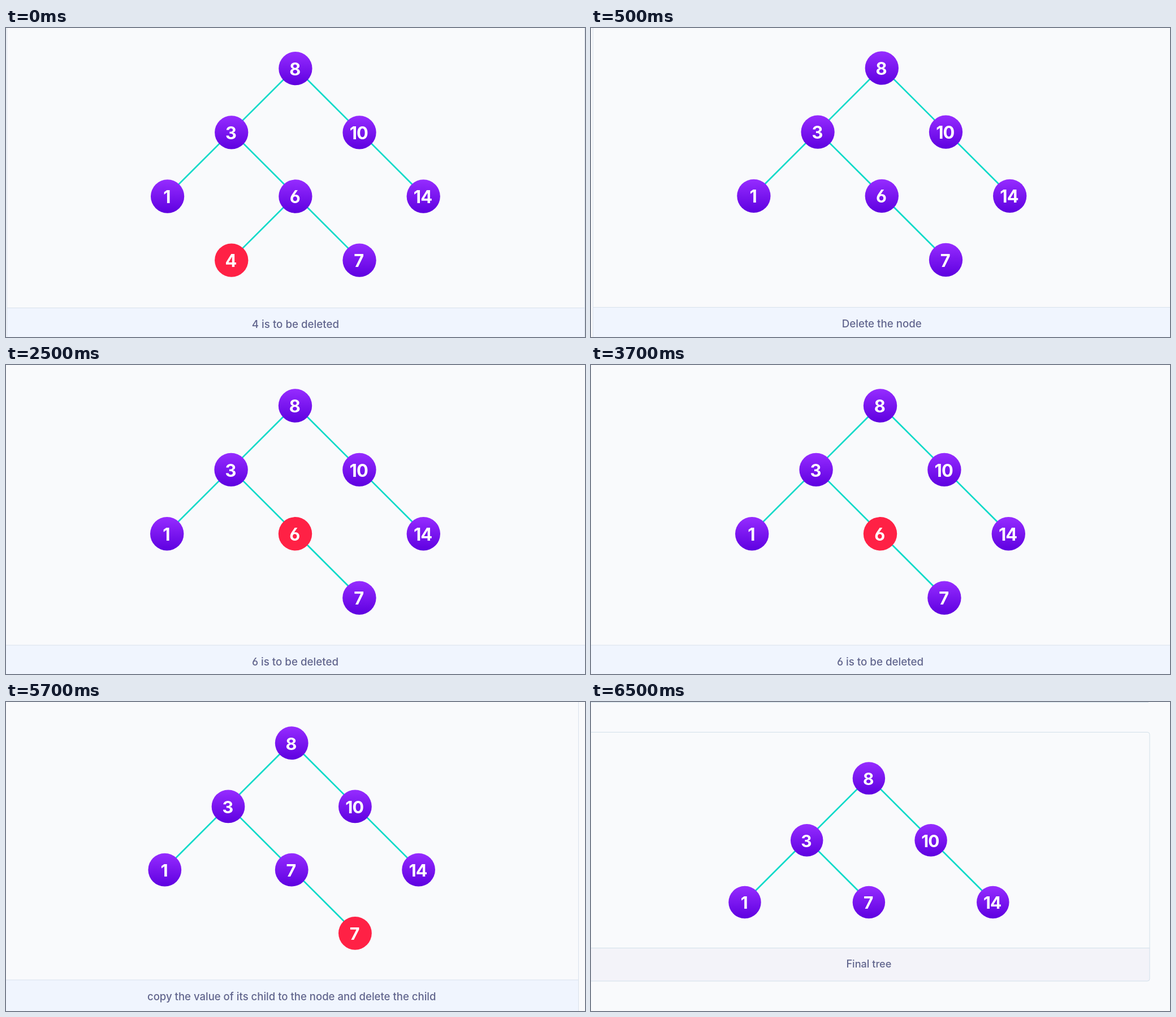
Animation of 1024x547 px, one loop 8 s. Source, as an HTML page:

```html
<!DOCTYPE html>
<html lang="en">
<head>
<meta charset="utf-8">
<title>Deleting nodes from a binary search tree</title>
<style>
  html, body { margin: 0; width: 100%; height: 100%; overflow: hidden; background: #f9fafc; }
  svg { display: block; width: 100vw; height: 100vh; }
  text { font-family: Inter, "Open Sans", sans-serif; text-anchor: middle; }
  .label { font-weight: 650; fill: #fff; letter-spacing: -.03em; font-feature-settings: "cv03"; }
  .caption { font-weight: 500; fill: #61658d; font-feature-settings: "cv03"; }
  .edge { stroke: #0adac8; stroke-width: 2.7; }
</style>
</head>
<body>
<svg id="stage" viewBox="0 0 1024 547">
  <defs>
    <linearGradient id="violet" x1="0" y1="0" x2="0" y2="1">
      <stop offset="0" stop-color="#962cff"/>
      <stop offset="1" stop-color="#5e00e0"/>
    </linearGradient>
  </defs>
  <g id="scene"></g>
</svg>
<script>
const LOOP = 8000;
const EDGE_LIFT = 1.5; // edges run slightly above the disc centres

// Position in the tree (column, row) and the slot of the parent.
const slots = {
  root: [0, 0],
  left: [-1, 1, 'root'],
  right: [1, 1, 'root'],
  leftLeft: [-2, 2, 'left'],
  middle: [0, 2, 'left'],
  rightRight: [2, 2, 'right'],
  lowLeft: [-1, 3, 'middle'],
  lowRight: [1, 3, 'middle']
};
const base = { root: 8, left: 3, right: 10, leftLeft: 1, rightRight: 14 };

// card: left, top, right, bottom; x and y place the root node.
const scenes = [
  { start: 0, x: 511.9, y: 71.7, step: 113.15, divider: 495.5, card: [1.5, -9, 1023.5, 600],
    nodes: { ...base, middle: 6, lowLeft: 4, lowRight: 7 }, red: 'lowLeft',
    caption: '4 is to be deleted' },
  { start: 500, x: 514.3, y: 70.9, step: 113.2, divider: 494.5, card: [3.5, -9, 1040, 600],
    nodes: { ...base, middle: 6, lowRight: 7 },
    caption: 'Delete the node' },
  { start: 2500, x: 511.5, y: 72, step: 113.4, divider: 496, card: [-9, -9, 1040, 600],
    nodes: { ...base, middle: 6, lowRight: 7 }, red: 'middle',
    caption: '6 is to be deleted' },
  { start: 4500, x: 505.2, y: 72.7, step: 112.2, divider: 492, card: [-9, -9, 1012.5, 600],
    nodes: { ...base, middle: 7, lowRight: 7 }, red: 'lowRight',
    caption: 'copy the value of its child to the node and delete the child' },
  { start: 6500, x: 491.4, y: 135.1, step: 109.7, divider: 435.5, card: [-9, 53.5, 988, 494],
    nodes: { ...base, middle: 7 }, footer: '#f3f3f9', border: '#d2e0ea', previousCard: true,
    caption: 'Final tree' }
];

function tag(name, attrs, content = '') {
  const list = Object.entries(attrs).map(([key, value]) => `${key}="${value}"`).join(' ');
  return `<${name} ${list}>${content}</${name}>`;
}

function drawCard({ card: [l, t, r, b], divider, footer = '#f0f5fe', border = '#d9e1ec', previousCard }) {
  const footerPath = `M${l} ${divider}H${r}V${b - 4}q0 4 -4 4H${l}Z`;
  return tag('path', { d: footerPath, fill: footer }) +
    tag('path', { d: `M${l} ${divider}H${r}`, stroke: border }) +
    tag('rect', { x: l, y: t, width: r - l, height: b - t, rx: 4, fill: 'none', stroke: border }) +
    (previousCard ? tag('path', { d: 'M0 .5H986', stroke: border }) : '');
}

function drawScene(scene) {
  const { x, y, step, nodes, red } = scene;
  const radius = step * 0.262;
  const place = slot => [x + slots[slot][0] * step, y + slots[slot][1] * step];
  let edges = '', discs = '';
  for (const [slot, value] of Object.entries(nodes)) {
    const [cx, cy] = place(slot);
    const parent = slots[slot][2];
    if (parent) {
      const [px, py] = place(parent);
      edges += tag('line', { class: 'edge', x1: px, y1: py - EDGE_LIFT, x2: cx, y2: cy - EDGE_LIFT });
    }
    discs += tag('circle', { cx, cy, r: radius, fill: slot === red ? '#ff2145' : 'url(#violet)' }) +
      tag('text', { class: 'label', x: cx - 1.2, y: cy + radius * 0.41, 'font-size': radius * 1.04 }, value);
  }
  const caption = tag('text', {
    class: 'caption', x, y: scene.divider + step * 0.317, 'font-size': step * 0.1655
  }, scene.caption);
  return drawCard(scene) + edges + discs + caption;
}

const group = document.getElementById('scene');
let shown;

function render(time) {
  const scene = scenes.findLast(s => s.start <= time % LOOP);
  if (scene !== shown) {
    group.innerHTML = drawScene(scene);
    shown = scene;
  }
}

const began = performance.now();
function tick() {
  render(performance.now() - began);
  requestAnimationFrame(tick);
}
tick();
</script>
</body>
</html>
```
